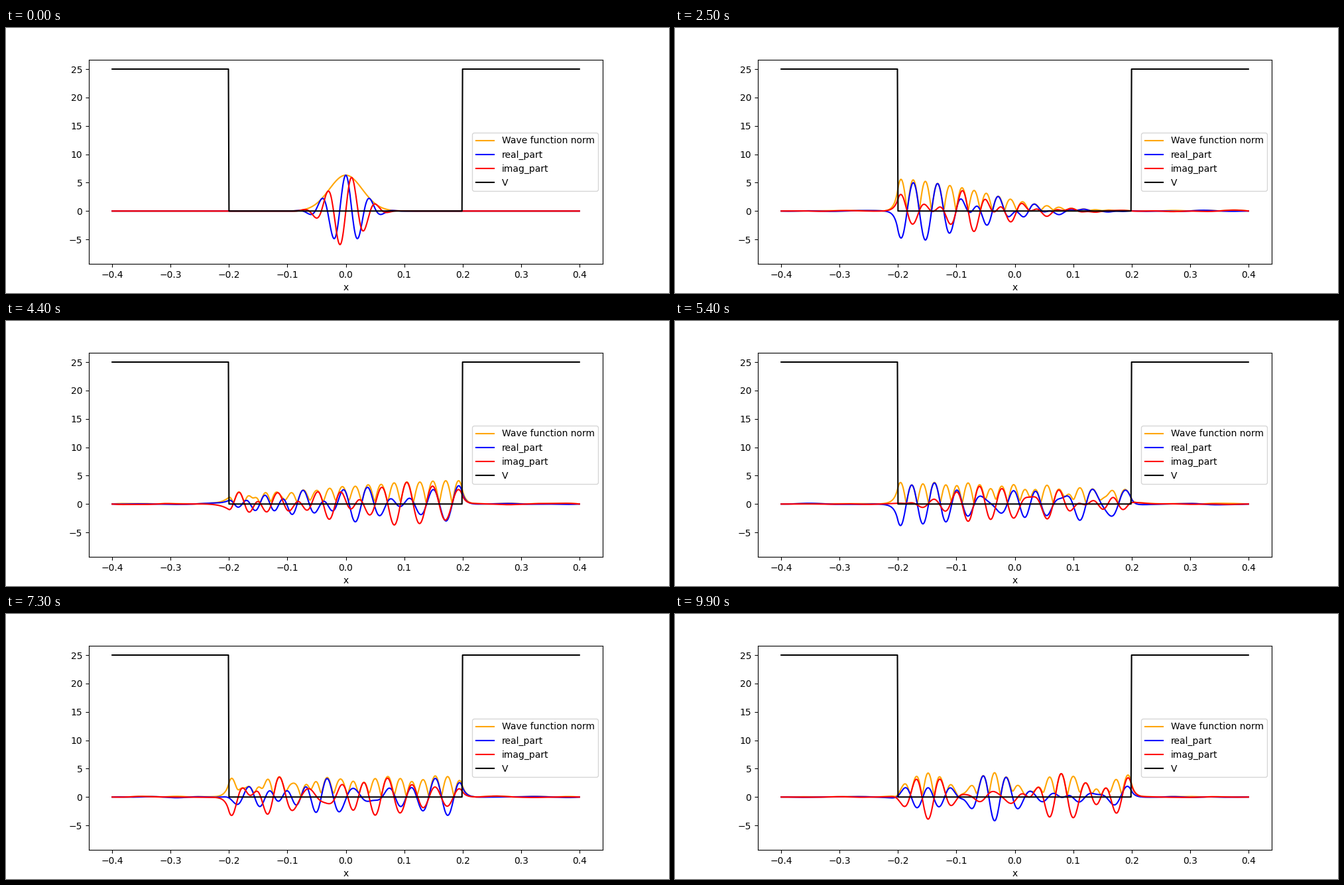
These frames come from a looping animation (1000 by 400 pixels, 10 s). A matplotlib script:

```python
import numpy as np
import matplotlib.pyplot as plt
from matplotlib.animation import FuncAnimation

FRAMES, INTERVAL = 100, 100
STEP = 1.655e-4        # simulated time per frame
K0 = 150.0             # mean wave number
SIGMA = 0.02           # packet width
DEPTH = 25000.0        # height of the walls
DX = 0.001

x = np.linspace(-0.4, 0.4, 801)
idx = np.arange(x.size) - 400
V = np.where((idx < -200) | (idx >= 200), DEPTH, 0.0)


def eigen_states():
    """Energies and modes of -1/2 d2/dx2 + V on the grid."""
    off = np.full(x.size - 1, -0.5 / DX**2)
    H = np.diag(1 / DX**2 + V) + np.diag(off, 1) + np.diag(off, -1)
    return np.linalg.eigh(H)


energy, modes = eigen_states()
amp = np.sqrt(2) / (2 * np.pi * SIGMA**2) ** 0.25
psi0 = amp * np.exp(-x**2 / (4 * SIGMA**2) + 1j * K0 * x)
coef = modes.T @ psi0


def psi(i):
    return modes @ (coef * np.exp(-1j * energy * STEP * i))


fig, ax = plt.subplots(figsize=(10, 4), dpi=100)
norm_line, = ax.plot([], [], color="orange", label="Wave function norm")
real_line, = ax.plot([], [], color="blue", label="real_part")
imag_line, = ax.plot([], [], color="red", label="imag_part")
ax.plot(x, V / DEPTH * 25, color="black", label="V")
ax.set_xlim(-0.44, 0.44)
ax.set_ylim(-9.304, 26.634)
ax.set_xlabel("x")
ax.legend(loc="center right")


def draw(i):
    p = psi(i)
    norm_line.set_data(x, np.abs(p))
    real_line.set_data(x, p.real)
    imag_line.set_data(x, p.imag)
    return norm_line, real_line, imag_line


anim = FuncAnimation(fig, draw, frames=FRAMES, interval=INTERVAL,
                     repeat=True, repeat_delay=0, blit=False)
plt.show()
```
